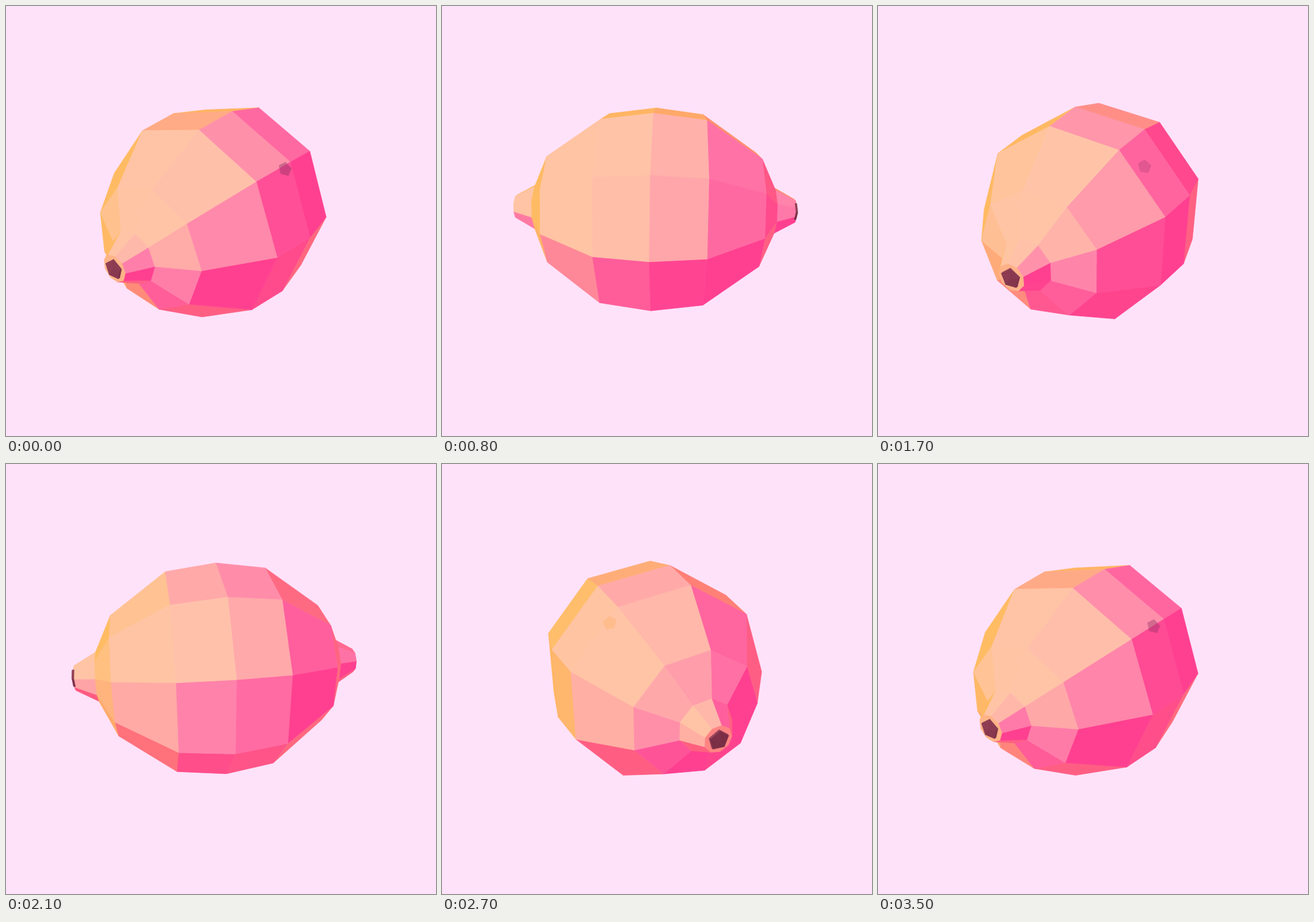
These frames come from a looping animation (748x748 px, 3.6 s). An HTML page with a canvas:

```html
<!DOCTYPE html>
<html lang="en">
<head>
<meta charset="utf-8">
<title>Low-poly lemon</title>
<style>
  html, body { margin: 0; width: 100%; height: 100%; overflow: hidden; background: #fee2fa; }
  canvas { display: block; width: 748px; height: 748px; }
</style>
</head>
<body>
<canvas id="stage" width="748" height="748"></canvas>
<script>
const ctx = document.getElementById('stage').getContext('2d');
const SIZE = 748, LOOP = 3600, STEP = 100;
const CX = 369, CY = 354.5, DIST = 887;
const PIVOT = -4; // sideways offset of the fruit from its turning axis
const TILT = 25 * Math.PI / 180;
const SIN_T = Math.sin(TILT), COS_T = Math.cos(TILT);

// Turn of the fruit: [ms, degrees]
const TURN = [[0, 0], [800, 56.6], [1300, 117.9], [1700, 171.4],
              [2100, 225.8], [2700, 302.6], [3500, 358.1], [3600, 360]];
const START = -35.7;

// Half profile along the long axis: [position, radius]
const HALF = [[242, 21], [205, 42], [176, 102], [83, 169]];
const PROFILE = [...HALF, [0, 180], ...HALF.map(([u, r]) => [-u, r]).reverse()];

const clamp = (x, a = 0, b = 1) => Math.min(b, Math.max(a, x));
const dot = (a, b) => a[0] * b[0] + a[1] * b[1] + a[2] * b[2];
const sub = (a, b) => a.map((x, i) => x - b[i]);
const unit = a => { const l = Math.hypot(...a); return a.map(x => x / l); };
const cross = (a, b) => [a[1] * b[2] - a[2] * b[1],
                         a[2] * b[0] - a[0] * b[2],
                         a[0] * b[1] - a[1] * b[0]];
const mix = (a, b, k) => a.map((x, i) => x + (b[i] - x) * k);
const rgb = c => `rgb(${c.map(Math.round).join(',')})`;

const ring = (u, r, n, off = 0) => Array.from({ length: n }, (_, i) =>
  ({ u, r, a: off + i * 2 * Math.PI / n }));

function strip(a, b, kind, faces) {
  a.forEach((p, i) => {
    const j = (i + 1) % a.length;
    faces.push({ kind, pts: [p, a[j], b[j], b[i]], lift: kind === 'dark' ? 25 : 0 });
  });
}

function buildFaces() {
  const faces = [];
  const rings = PROFILE.map(([u, r]) => ring(u, r, 9));
  for (let i = 1; i < rings.length; i++) strip(rings[i - 1], rings[i], 'skin', faces);
  for (const s of [1, -1]) {
    faces.push({ kind: 'cap', pts: ring(s * 242, 21, 9), lift: 15 });
    const base = ring(s * 242, 15, 5, 0.3), top = ring(s * 245, 14.5, 5, 0.3);
    strip(base, top, 'dark', faces);
    top.forEach((p, i) => faces.push({
      kind: 'dark', lift: 30, pts: [p, top[(i + 1) % 5], { u: s * 247, r: 0, a: 0 }]
    }));
  }
  return faces;
}
const FACES = buildFaces();

function slope(i) {
  const n = TURN.length - 1;
  const gap = k => {
    const [a, b] = [TURN[(k + n) % n], TURN[(k + n) % n + 1]];
    return [b[0] - a[0], (b[1] - a[1]) / (b[0] - a[0])];
  };
  const [h0, d0] = gap(i - 1), [h1, d1] = gap(i % n);
  return (d0 * h1 + d1 * h0) / (h0 + h1);
}

function angleAt(ms) {
  let i = 0;
  while (ms >= TURN[i + 1][0]) i++;
  const [t0, a0] = TURN[i], [t1, a1] = TURN[i + 1];
  const h = t1 - t0, s = (ms - t0) / h, q = 1 - s;
  const turn = a0 * q * q * (1 + 2 * s) + a1 * s * s * (3 - 2 * s)
    + h * slope(i) * s * q * q - h * slope(i + 1) * s * s * q;
  return (START - turn) * Math.PI / 180;
}

function place({ u, r, a }, phi) {
  const side = r * Math.cos(a) + PIVOT, up = r * Math.sin(a);
  const x = u * Math.sin(phi) + side * Math.cos(phi);
  const z = u * Math.cos(phi) - side * Math.sin(phi);
  return [x, up * COS_T - z * SIN_T, z * COS_T + up * SIN_T];
}

function project([x, y, z]) {
  const k = DIST / (DIST - z);
  return [CX + x * k, CY - y * k];
}

function shade(kind, n, facing) {
  const [nx, ny, nz] = n;
  if (kind === 'dark') {
    return mix([122, 46, 70], [152, 68, 90], clamp(0.45 - nx * 0.6 + ny * 0.7));
  }
  const left = Math.max(0, -nx);
  const t = clamp(-0.6 * nx + 0.56 * ny + 1.51 * nz - 0.59 + 0.35 * left, 0, 1.05);
  const base = [255, 64 + 126 * t, 144 + 26 * Math.min(1, 2 * t) - 12 * left];
  let rim = clamp((0.35 + 0.2 * left - facing) / 0.3);
  rim *= 0.35 + 0.55 * clamp(0.45 - nx * 0.7 + ny * 0.6);
  if (kind === 'cap') rim = 0.4;
  return mix(base, [255, 188, 92], rim);
}

function trace(pts) {
  ctx.beginPath();
  pts.forEach(p => ctx.lineTo(...project(p)));
  ctx.closePath();
}

// The far tip shimmers through the skin
function ghostTip(phi) {
  const c = Math.cos(phi), s = c > 0 ? -1 : 1;
  if (Math.abs(c) < 0.6) return;
  const x = s * Math.sin(phi);
  trace(ring(s * 246, 16, 5, 0.3).map(p => place(p, phi)));
  ctx.fillStyle = x > 0
    ? `rgba(130,45,95,${clamp((x - 0.28) * 1.3, 0.1, 0.45)})`
    : 'rgba(255,178,110,0.42)';
  ctx.fill();
}

function draw(ms) {
  const phi = angleAt(ms);
  ctx.fillStyle = '#fee2fa';
  ctx.fillRect(0, 0, SIZE, SIZE);

  const seen = [];
  for (const f of FACES) {
    // Only the tip turned to the viewer shows its dark stub
    if (f.kind === 'dark' && f.pts[0].u * Math.cos(phi) < 0) continue;
    const pts = f.pts.map(p => place(p, phi));
    const mid = [0, 1, 2].map(i => pts.reduce((sum, p) => sum + p[i], 0) / pts.length);
    let n = unit(cross(sub(pts[1], pts[0]), sub(pts[2], pts[0])));
    if (dot(n, mid) < 0) n = n.map(x => -x);
    const facing = dot(n, unit(sub([0, 0, DIST], mid)));
    if (facing > 0) seen.push({ pts, z: mid[2] + f.lift, color: rgb(shade(f.kind, n, facing)) });
  }
  seen.sort((a, b) => a.z - b.z);

  ctx.lineJoin = 'round';
  ctx.lineWidth = 0.7;
  for (const f of seen) {
    trace(f.pts);
    ctx.fillStyle = ctx.strokeStyle = f.color;
    ctx.fill();
    ctx.stroke();
  }
  ghostTip(phi);
}

const begin = performance.now();
function tick() {
  const ms = (performance.now() - begin) % LOOP;
  draw(Math.floor(ms / STEP) * STEP);
  requestAnimationFrame(tick);
}
tick();
</script>
</body>
</html>
```
